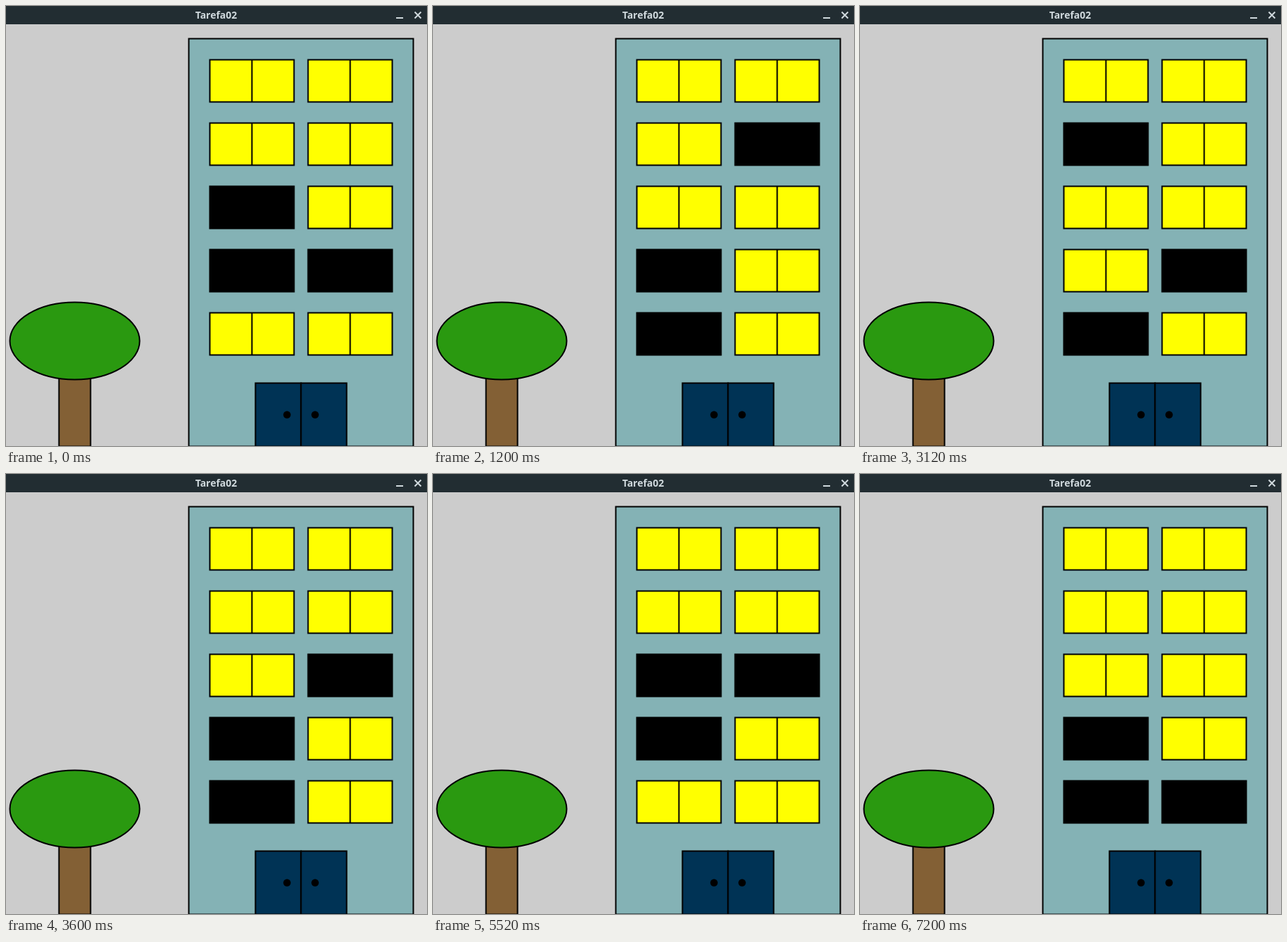
An HTML page for the animation above (8.4 s loop, 600 px wide and 626 px high).

```html
<!DOCTYPE html>
<html>
<head>
<meta charset="utf-8">
<style>
html, body { margin: 0; width: 100%; height: 100%; overflow: hidden; background: #ccc; }
svg { display: block; }
</style>
</head>
<body>
<svg width="600" height="626" viewBox="0 0 600 626">
  <g id="scene" transform="translate(.5 26.5)" stroke="#000" stroke-width="2">
    <rect x="260" y="20" width="320" height="580" fill="#84b2b5"/>
    <g id="windows"></g>
    <g fill="#003355">
      <rect x="355" y="510" width="65" height="90"/>
      <rect x="420" y="510" width="65" height="90"/>
    </g>
    <g stroke="none">
      <circle cx="400" cy="555" r="5.3"/>
      <circle cx="440" cy="555" r="5.3"/>
    </g>
    <rect x="75" y="500" width="45" height="100" fill="#836035"/>
    <ellipse cx="97.5" cy="450" rx="92.5" ry="55" fill="#2a9910"/>
  </g>
  <rect width="600" height="26" fill="#222d32"/>
  <text x="299.5" y="18" text-anchor="middle" fill="#cfd8dc"
        font-family="'Noto Sans', 'Open Sans', sans-serif" font-size="14" font-weight="700">Tarefa02</text>
  <path d="M556 17H566M582.5 8.5L591.5 17.5M591.5 8.5L582.5 17.5" stroke="#cfd8dc" stroke-width="2"/>
</svg>
<script>
const STEP = 1200;
// Unlit windows per step, numbered left to right, top to bottom
const dark = ['467', '368', '278', '568', '456', '348', '689'];

const group = document.getElementById('windows');
const panes = Array.from({ length: 10 }, (_, i) => {
  const x = 290 + (i % 2) * 140;
  const y = 50 + Math.floor(i / 2) * 90;
  const pane = document.createElementNS('http://www.w3.org/2000/svg', 'path');
  pane.setAttribute('d', `M${x} ${y}h120v60h-120zM${x + 60} ${y}v60`);
  return group.appendChild(pane);
});

function draw(now) {
  const off = dark[Math.floor(now / STEP) % dark.length];
  panes.forEach((pane, i) => pane.setAttribute('fill', off.includes(i) ? '#000' : '#ff0'));
  requestAnimationFrame(() => draw(performance.now() - start));
}

const start = performance.now();
draw(0);
</script>
</body>
</html>
```
